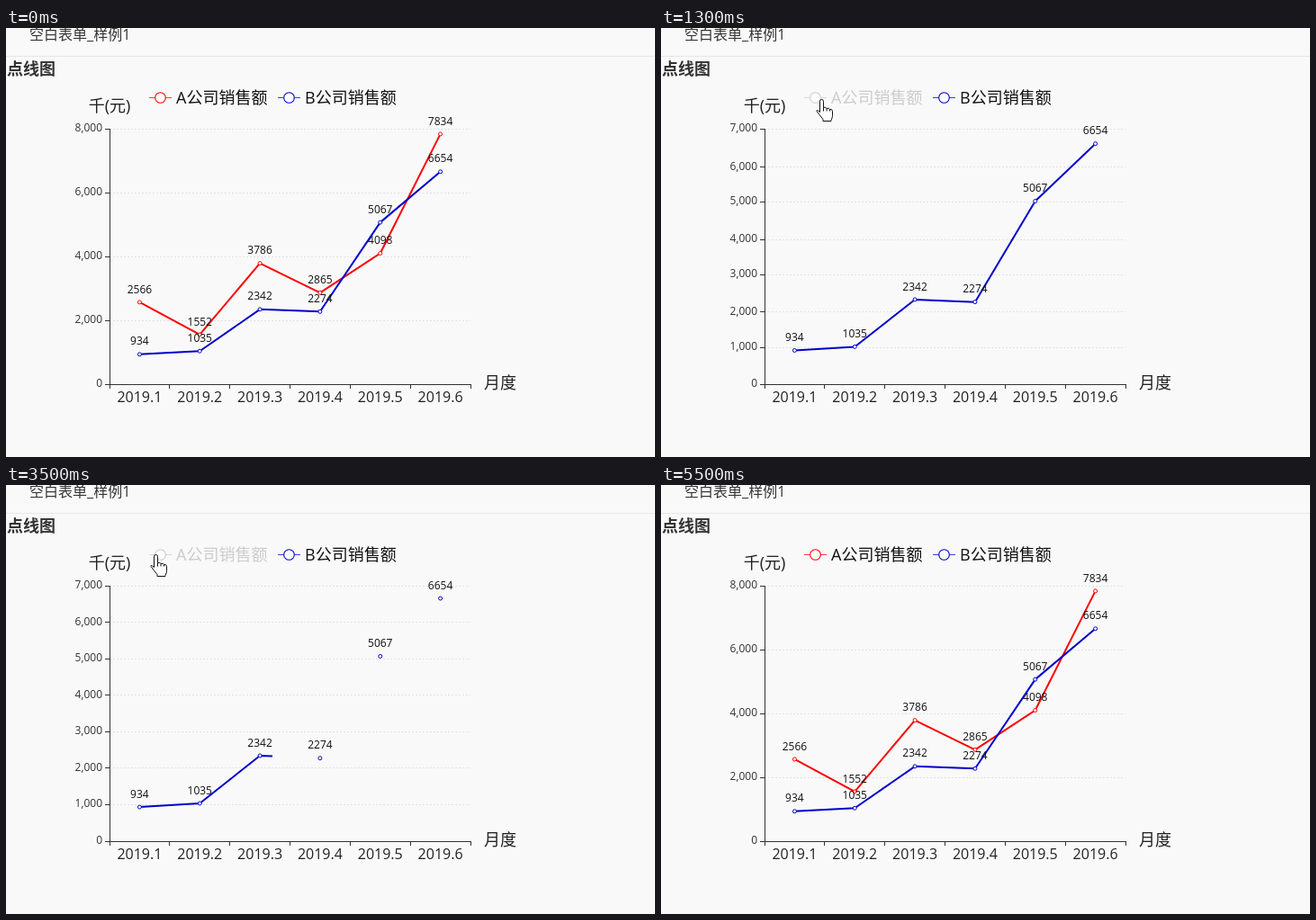
An HTML page that plays this animation: 721x477 px, repeating every 6 s.

```html
<!DOCTYPE html>
<html lang="zh">
<head>
<meta charset="utf-8">
<style>
  html, body { margin: 0; width: 100%; height: 100%; overflow: hidden; background: #f9f9f9; }
  svg { display: block; font-family: "Open Sans", "Noto Sans CJK SC", "Noto Sans CJK", sans-serif; }
</style>
</head>
<body>
<svg width="721" height="477" viewBox="0 0 721 477">
  <path d="M0 31.5H721" stroke="#e8e8e8"/>
  <text x="26" y="13" font-size="16" fill="#333">空白表单_样例1</text>
  <text x="1" y="52" font-size="18" font-weight="bold" fill="#333">点线图</text>
  <text x="531" y="401" font-size="18" fill="#222">月度</text>
  <g id="chart"></g>
</svg>
<script>
const LOOP = 6000, STEP = 100;
const LEFT = 115, RIGHT = 516, TOP = 112, BASE = 396, HEIGHT = BASE - TOP;
const HIDE_A = 900, HIDE_B = 2100, SHOW_B = 2500, SHOW_A = 3600;
const A = { name: 'A公司销售额', color: '#f00', x: 159, data: [2566, 1552, 3786, 2865, 4098, 7834] };
const B = { name: 'B公司销售额', color: '#0000cd', x: 302, data: [934, 1035, 2342, 2274, 5067, 6654] };
const ARROW = 'M0 0V16l4-3.5 2.5 6 2.5-1-2.5-6h5z';
const HAND = 'M-3 13V1a2 2 0 0 1 4 0v7q3-1 3.5 1 3-1 3.5 1 3-.5 3 2v5q0 2-1.5 5v1h-9v-2q-4-5-7-9-.5-2.5 3.5 1z' +
  'M1 8v4M4.5 9v3M8 10v2';
// time, x, y of the pointer tip
const TRACK = [
  [100, 702, 376], [300, 520, 235], [500, 330, 80], [600, 255, 55], [700, 204, 60], [800, 184, 81],
  [900, 175, 80], [1400, 180, 80], [1700, 265, 80], [1900, 323, 78], [2500, 323, 78], [2800, 296, 89],
  [3200, 200, 82], [3500, 167, 78], [3800, 167, 78], [4200, 171, 84], [4500, 655, 176], [4700, 715, 268], [4900, 722, 276]
];

const lerp = (a, b, p) => a + (b - a) * p;
const ease = p => 1 - (1 - Math.min(1, Math.max(0, p))) ** 3;
const crisp = v => Math.floor(v) + 0.5;
const between = (t, a, b) => t >= a && t < b;
const text = (x, y, size, str, anchor = 'middle', fill = '#111') =>
  `<text x="${x}" y="${y}" font-size="${size}" text-anchor="${anchor}" fill="${fill}">${str}</text>`;
const path = (d, stroke, extra = '') => `<path d="${d}" fill="none" stroke="${stroke}" ${extra}/>`;
const circle = (x, y, r, stroke, width = 1) =>
  `<circle cx="${x}" cy="${y}" r="${r}" fill="#fff" stroke="${stroke}" stroke-width="${width}"/>`;

function axisLeft(t) {
  if (between(t, HIDE_B, SHOW_B)) return lerp(LEFT, 101, ease((t - HIDE_B + STEP) / 300));
  if (t >= SHOW_B) return lerp(101, LEFT, ease((t - SHOW_B) / 700));
  return LEFT;
}

// pixels per unit
function scaleAt(t) {
  const big = HEIGHT / 8000, small = HEIGHT / 7000;
  return t < SHOW_A ? lerp(big, small, ease((t - HIDE_A) / 700))
                    : lerp(small, big, ease((t - SHOW_A) / 700));
}

function axes(t, k) {
  const x0 = axisLeft(t), edge = crisp(x0);
  const empty = between(t, HIDE_B, SHOW_B), small = between(t, HIDE_A, SHOW_A);
  const max = empty ? 1 : small ? 7000 : 8000;
  const gap = empty ? 0.2 : small ? 1000 : 2000;
  const count = Math.round(max / gap);
  const tickX = empty ? x0 : LEFT;
  let grid = '', ticks = '', labels = '';
  for (let i = 0; i <= count; i++) {
    const v = i * gap;
    const moving = !empty && v % 2000 === 0 && v < 8000;
    const pos = BASE - v * (moving ? k : HEIGHT / max);
    const y = crisp(pos);
    if (i) grid += `M${tickX} ${y}H${RIGHT}`;
    ticks += `M${tickX - 5} ${y}h5`;
    const str = empty ? String(+v.toFixed(1)) : v.toLocaleString('en-US');
    labels += text(tickX - 8, Math.round(pos) + 3, 12, str, 'end', '#333');
  }
  const band = (RIGHT - x0) / 6;
  for (let i = 0; i <= 6; i++) {
    ticks += `M${crisp(x0 + band * i)} ${BASE}v5`;
    if (i < 6) labels += text(x0 + band * (i + 0.5), 416, 16, '2019.' + (i + 1), 'middle', '#222');
  }
  return path(grid, '#e0e2e6', 'stroke-dasharray="2 2"') +
    path(`M${edge} ${TOP}V${BASE + 1}M${edge} ${BASE + 0.5}H${RIGHT + 1}` + ticks, '#333') +
    labels + text(x0, 93, 18, '千(元)', 'middle', '#222');
}

function series(s, k, clip, grow, hover) {
  const id = 'clip' + s.name[0];
  const pts = s.data.map((v, i) => [LEFT + (RIGHT - LEFT) / 6 * (i + 0.5), BASE - v * k]);
  const line = `<clipPath id="${id}"><rect width="${clip}" height="477"/></clipPath>` +
    path('M' + pts.join('L'), s.color, `stroke-width="2" stroke-linejoin="bevel" clip-path="url(#${id})"`);
  const r = hover ? 5 : 2 * grow;
  const dots = pts.map(([x, y]) => circle(x, y, r, s.color, hover ? 1.2 : 1)).join('');
  const lift = hover ? 12.88 : 9.88;
  const labels = pts.map(([x, y], i) => text(x, Math.floor(y - lift), 12, s.data[i])).join('');
  return line + dots + labels;
}

function legend(s, on) {
  const color = on ? s.color : '#ccc';
  return path(`M${s.x} 77.5h25`, color, 'stroke-opacity=".75"') +
    circle(s.x + 12.5, 77.5, 5.8, color, 1.1) +
    text(s.x + 30, 84, 18, s.name, 'start', on ? '#111' : '#ccc');
}

function pointer(t) {
  if (!between(t, 100, 4900)) return '';
  const n = TRACK.findIndex(p => p[0] > t);
  const [t0, x0, y0] = TRACK[n - 1], [t1, x1, y1] = TRACK[n];
  const p = (t - t0) / (t1 - t0);
  const shape = between(t, 900, 4300) ? HAND : ARROW;
  return `<path transform="translate(${crisp(lerp(x0, x1, p))} ${crisp(lerp(y0, y1, p))})" d="${shape}" ` +
    'fill="#fff" stroke="#111" stroke-linejoin="round"/>';
}

function scene(t) {
  const k = scaleAt(t);
  const hasA = !between(t, HIDE_A, SHOW_A), hasB = !between(t, HIDE_B, SHOW_B);
  let out = axes(t, k);
  if (hasA) {
    const back = t >= SHOW_A;
    out += series(A, k, back ? 263 + (t - 4200) * 0.182 : 721, back ? ease((t - SHOW_A) / 800) : 1);
  }
  if (hasB) {
    const drawing = between(t, SHOW_B, SHOW_A);
    out += series(B, k, drawing ? 168 + (t - 2800) * 0.183 : 721,
      drawing ? ease((t - SHOW_B) / 800) : 1, between(t, 1800, HIDE_B));
  }
  return out + legend(A, hasA) + legend(B, hasB) + pointer(t);
}

const chart = document.getElementById('chart');
const start = performance.now();
let shown = -1;
function tick(now) {
  const t = Math.floor(Math.max(0, now - start) % LOOP / STEP) * STEP;
  if (t !== shown) {
    chart.innerHTML = scene(t);
    shown = t;
  }
  requestAnimationFrame(tick);
}
tick(start);
</script>
</body>
</html>
```
